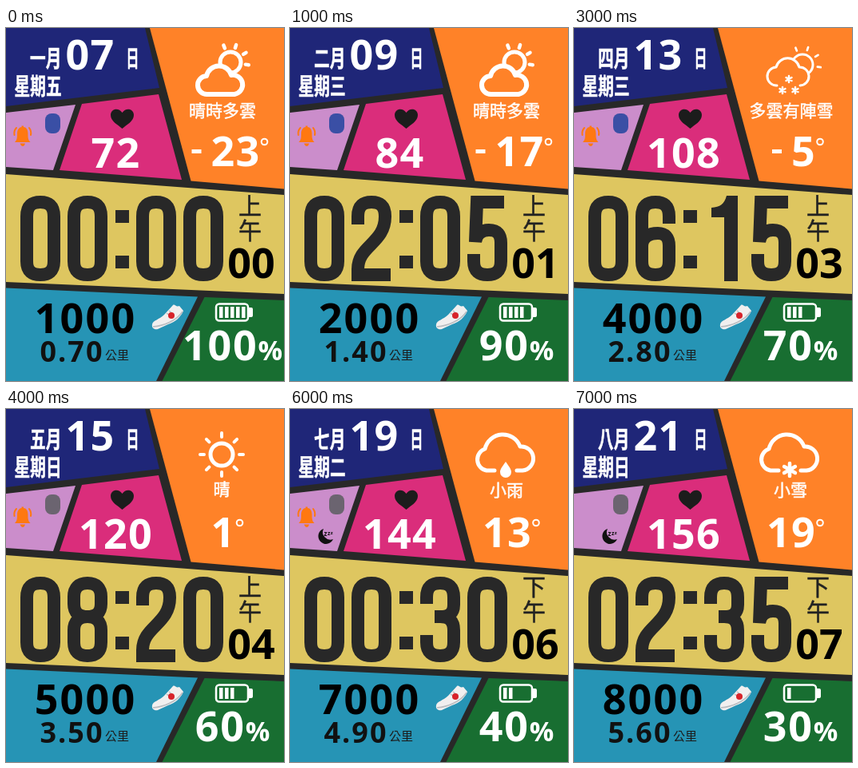
Animation, 348 px wide and 442 px high, one loop 8000 ms. Source, as an HTML page:

```html
<!DOCTYPE html>
<html lang="zh-Hant">
<head>
<meta charset="utf-8">
<title>Watch face</title>
<style>
html, body { margin: 0; width: 100%; height: 100%; overflow: hidden; background: #282828; }
svg { display: block; width: 348px; height: 442px; }
.num { font: 700 52px "Open Sans", "Noto Sans", sans-serif; letter-spacing: 1.3px; }
.cjk { font-family: "Noto Sans CJK TC", "Noto Sans CJK", sans-serif; }
.mid { text-anchor: middle; }
.line { fill: none; stroke: #fff; stroke-linecap: round; stroke-linejoin: round; }
.cover { fill: #ff8228; }
</style>
</head>
<body>
<svg viewBox="0 0 348 442" xmlns="http://www.w3.org/2000/svg">
  <rect width="348" height="442" fill="#282828"/>
  <path fill="#1f2678" d="M0 0H174L192 75L0 98Z"/>
  <path fill="#ff8228" d="M180 0H348V201.500L231.500 191.500Z"/>
  <path fill="#cb8dcb" d="M0 106L87 96L59 178L0 174Z"/>
  <path fill="#da2d7b" d="M95 95L191 83L220 190L67 178Z"/>
  <path fill="#dec660" d="M0 183L348 209V333L0 318Z"/>
  <path fill="#2694b5" d="M0 325.500L240 336.500L188 442H0Z"/>
  <path fill="#186e31" d="M248.500 337L348 341V442H195.500Z"/>
  <path fill="#1c1c1c" d="M145.500 126C140 121 131 117 131 109C131 101 141 99 145.500 106C150 99 160 101 160 109C160 117 151 121 145.500 126Z"/>
  <g id="shoe">
    <path fill="#f1efef" d="M183 371C184 366 192 365 198 359L209 347C211 345 213 350 217 348L222 354C219 362 212 368 203 371L190 377C186 378 182 376 183 371Z"/>
    <path fill="none" stroke="#b9bcc0" stroke-width="1.500" d="M184 374C198 373 214 366 221 355M201 357L205 360M204 354L208 357"/>
    <circle cx="207" cy="360" r="4" fill="#d8232a"/>
  </g>
  <rect x="263" y="345.500" width="40" height="21" rx="4" fill="none" stroke="#fff" stroke-width="2.500"/>
  <path fill="#fff" d="M304 350H307Q309 350 309 352V360Q309 362 307 362H304Z"/>
  <text class="cjk" x="124" y="415" font-size="15" font-weight="500" fill="#1c1c1c">公里</text>
  <path fill="#282828" d="M137 228H154V244H137ZM137 285H154V301H137Z"/>
  <g id="live"></g>
</svg>
<script>
const STEP = 1000, COUNT = 8;
const live = document.getElementById("live");
const pad = n => String(n).padStart(2, "0");

// Condensed clock digits in a 50 x 107 cell
const TOP = "C8 12 15 8 25 8S42 12 42 26";
const BASE = "C42 95 35 99 25 99S8 95 8 82";
const DIGITS = {
  0: `M8 82V26${TOP}V82${BASE}Z`,
  2: `M8 36V26${TOP}C42 60 8 62 8 92V99H49`,
  3: `M8 34V26${TOP}V35C42 46 36 50 25 50H18M25 50C37 50 42 56 42 67V82${BASE}V73`,
  5: `M46 8H12L10 58C11 47 19 43 27 43C38 43 42 49 42 59V82${BASE}V73`,
  6: `M42 35V26C42 12 35 8 25 8S8 12 8 26V82C8 95 15 99 25 99S42 95 42 82V63C42 52 37 47 28 47C17 47 8 52 8 63`,
  8: `M25 8C14 8 8 14 8 25V34C8 45 14 50 25 50S42 45 42 34V25C42 14 36 8 25 8ZM25 50C14 50 8 56 8 67V82C8 94 14 99 25 99S42 94 42 82V67C42 56 36 50 25 50Z`
};
const SOLID = {
  1: "M42 0V107H25V27H9V15C20 14 25 11 28 0Z",
  4: "M24 0H44V71H51V87H44V107H28V87H0V71ZM28 71V28L15 71Z"
};

function clockDigit(d, x) {
  const at = `transform="translate(${x} 210)"`;
  return SOLID[d]
    ? `<path ${at} fill="#282828" fill-rule="evenodd" d="${SOLID[d]}"/>`
    : `<path ${at} fill="none" stroke="#282828" stroke-width="16" d="${DIGITS[d]}"/>`;
}

const num = (s, x, y, fill = "#fff", extra = "") =>
  `<text class="num mid" x="${x}" y="${y}" fill="${fill}" ${extra}>${s}</text>`;
const cjk = (s, x, y, size, fill = "#fff") =>
  `<text class="cjk mid" x="${x}" y="${y}" font-size="${size}" font-weight="500" fill="${fill}" stroke="${fill}" stroke-width=".5">${s}</text>`;
const narrow = (s, x, y, sx) =>
  `<text class="cjk" transform="translate(${x} ${y}) scale(${sx} 1)" font-size="29" font-weight="700" fill="#fff" stroke="#fff" stroke-width=".6">${s}</text>`;
const line = (d, w, cls = "") => `<path class="line ${cls}" stroke-width="${w}" d="${d}"/>`;
const ring = (x, y, r, w) => `<circle class="line" cx="${x}" cy="${y}" r="${r}" stroke-width="${w}"/>`;
const shift = (x, y, body, scale = 1) =>
  `<g transform="translate(${x} ${y}) scale(${scale})">${body}</g>`;

// Weather icons
const CLOUD = "M14 40A11.500 11.500 0 0 1 13 17A16 16 0 0 1 44 16A12 12 0 0 1 48 40";

// Short strokes between two radii around a centre
function spokes(x, y, from, to, angles, w) {
  return line(angles.map(a => {
    const c = Math.cos(a * Math.PI / 180), s = Math.sin(a * Math.PI / 180);
    return `M${x + from * c} ${y + from * s}L${x + to * c} ${y + to * s}`;
  }).join(""), w);
}
const star = (x, y, r, w) => spokes(x, y, -r, r, [30, 90, 150], w);
const sun = (x, y, w) =>
  ring(x, y, 13, w) + spokes(x, y, 19, 23, [-112, -72, -32, 8], w * 0.9);
const showers = (x, y, w, drops) =>
  shift(x, y, line("M13 38A11.500 11.500 0 0 1 12 15A15 15 0 0 1 41 15A11 11 0 0 1 42 38", w, "cover")) + drops;
const bigCloud = drop =>
  line("M256 77H246A14 14 0 0 1 244 50A23 23 0 0 1 288 47A15 15 0 0 1 291 77H284", 5) + drop;

const WEATHER = [
  ["晴時多雲", 271, 111, () => sun(281, 43, 5) + shift(238, 43, line(CLOUD + "Z", 6, "cover"))],
  ["多雲有陣雨", 269, 108, () => sun(277, 46, 4.500) + showers(235, 32, 4.500,
    line("M251 67V76M260 66V84M269 67V78M278 66V73", 4))],
  ["多雲有陣雪", 272, 111, () => sun(286, 46, 3) + showers(241, 34, 3,
    star(269, 64, 4, 2.500) + star(261, 78, 4, 2.500) + star(277, 78, 4, 2.500))],
  ["晴", 270, 108, () => ring(270, 57, 14, 5) +
    spokes(270, 57, 22, 27, [0, 45, 90, 135, 180, 225, 270, 315], 4)],
  ["多雲", 270, 108, () =>
    line("M262 42A21 21 0 0 1 299 46A14 14 0 0 1 300 75H288", 4) +
    shift(231, 36, line(CLOUD + "Z", 3.600, "cover"), 1.160)],
  ["小雨", 271, 109, () => bigCloud(`<path fill="#fff" d="M270 66C274 72 277 75 277 79A7 7 0 0 1 263 79C263 75 266 72 270 66Z"/>`)],
  ["小雪", 271, 109, () => bigCloud(star(270, 76, 8, 4.500))]
];

function weather(i) {
  const [label, x, y, icon] = WEATHER[Math.max(0, i - 1)];
  return icon() + cjk(label, x, y, 21);
}

function temperature(t) {
  const s = String(Math.abs(t)), neg = t < 0, w = 31 * s.length;
  const left = (neg ? 281.500 : 278) - (w + 12 + (neg ? 24 : 0)) / 2;
  const x = left + (neg ? 24 : 0);
  return (neg ? `<rect x="${left}" y="152" width="12" height="5" fill="#fff"/>` : "") +
    num(s, x + w / 2, 173) + ring(x + w + 5, 142.500, 3.800, 2);
}

const BELL = `<path fill="#ff7811" d="M11 143C14 140 14 137 14 132C14 127 17 124 19.500 124V122.500H22V124C25 124 27.500 127 27.500 132C27.500 137 27.500 140 30.500 143ZM17.500 144.500H24Q23 148 21 148T17.500 144.500Z"/>
  <path fill="none" stroke="#ff7811" stroke-width="2" stroke-linecap="round" d="M13 125Q9.500 129 10.500 134M29 125Q32 129 31 134"/>`;
const MOON = `<path fill="#111" d="M42 150A9.700 9.700 0 1 0 54 163A9.500 9.500 0 0 1 42 150Z"/>
  <text x="42.500" y="159" font-family="'Open Sans', sans-serif" font-weight="700" font-size="8" letter-spacing=".5" fill="#111">z<tspan dy="-1" font-size="7">z</tspan><tspan dy="-1" font-size="6">z</tspan></text>`;
const badge = on => `<rect x="49" y="107" width="19" height="25" rx="8" fill="${on ? "#3a4fa5" : "#6b6470"}"/>`;

function face(i) {
  const charge = 100 - 10 * i;
  const clock = pad(2 * i % 12) + pad(5 * i);
  let out = narrow("一二三四五六七八"[i] + "月", 30, 49, 0.680) +
    narrow("星期" + "五三五三日五二日"[i], 10.500, 84, 0.680) +
    narrow("日", 150.500, 49, 0.550) +
    num(pad(7 + 2 * i), 105.500, 52) +
    num(72 + 12 * i, 137.500, 175) +
    weather(i) + temperature(-23 + 6 * i) +
    badge(i < 4) + (i < 7 ? BELL : "") + (i > 4 ? MOON : "");
  [18, 77, 163, 222].forEach((x, k) => out += clockDigit(clock[k], x));
  out += cjk(i < 6 ? "上" : "下", 305.500, 234, 29, "#222") +
    cjk("午", 305.500, 265, 29, "#222") +
    num(pad(i), 307, 313, "#000", 'style="letter-spacing:0"') +
    num(1000 * (i + 1), 99.500, 381.500, "#000", 'style="letter-spacing:2.200px"') +
    num((0.7 * (i + 1)).toFixed(2), 82.500, 418, "#111", 'style="font-size:36px;letter-spacing:2px"') +
    num(`${charge}<tspan style="font-size:34px;letter-spacing:0">%</tspan>`, 283.500, 415.500, "#fff", 'style="letter-spacing:1.800px"');
  for (let k = 0; k < Math.floor(charge / 20); k++)
    out += `<rect x="${267 + 7 * k}" y="349" width="4.500" height="14" fill="#fff"/>`;
  return out;
}

let shown = -1;
const start = performance.now();
function tick() {
  const i = Math.floor((performance.now() - start) / STEP) % COUNT;
  if (i !== shown) live.innerHTML = face(shown = i);
  requestAnimationFrame(tick);
}
tick();
</script>
</body>
</html>
```
